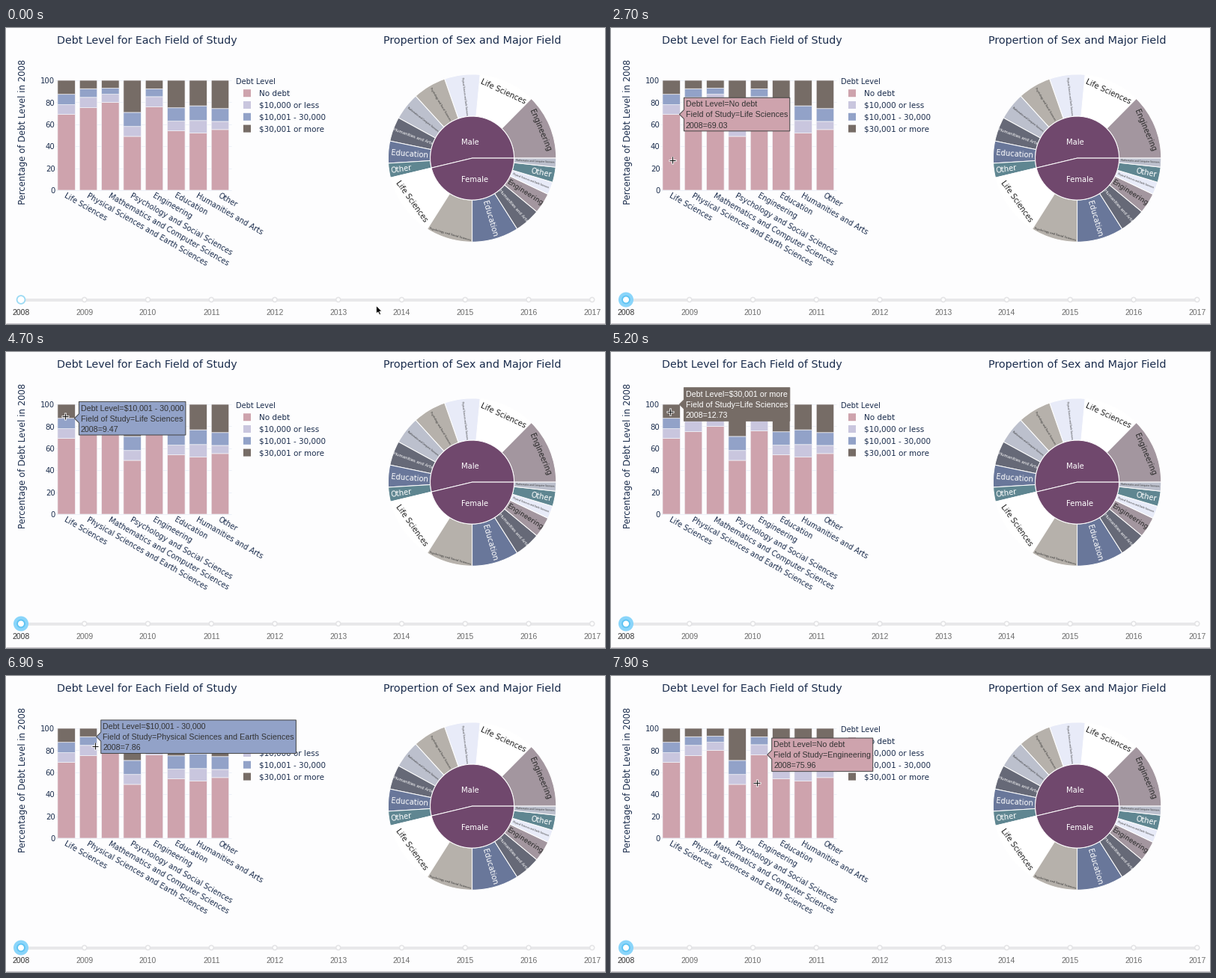
Animation, 800 px wide and 396 px high, one loop 8 s. Source, as a matplotlib script:

```python
import math

import numpy as np
import matplotlib.pyplot as plt
from matplotlib.animation import FuncAnimation
from matplotlib.patches import Circle, Polygon, Rectangle, Wedge

W, H, DPI = 800, 396, 100
PX = 72 / DPI
STEP, FRAMES = 100, 80
NAVY, DARK = "#1b2d4d", "#333333"
SANS, ARIAL = "DejaVu Sans", "Liberation Sans"

FIELDS = ["Life Sciences", "Physical Sciences and Earth Sciences",
          "Mathematics and Computer Sciences", "Psychology and Social Sciences",
          "Engineering", "Education", "Humanities and Arts", "Other"]
LEVELS = ["No debt", "$10,000 or less", "$10,001 - 30,000", "$30,001 or more"]
LEVEL_COLORS = ["#cea3ad", "#c9c6de", "#92a2c8", "#766c66"]
# Cumulative height of each stacked segment
TOPS = [(69.03, 77.80, 87.27, 100), (75.1, 84.5, 92.36, 100),
        (80, 87.3, 92.8, 100), (49, 58, 70.8, 100),
        (75.96, 85.1, 92.3, 100), (54, 62.8, 75, 100),
        (52, 63.4, 76.8, 100), (55.2, 62.6, 74.3, 100)]
PLOT_LEFT, SLOT, BAR_W, BASE, UNIT = 66, 29.33, 23.5, 217, 1.47

fig = plt.figure(figsize=(W / DPI, H / DPI), dpi=DPI, facecolor="#fdfdfe")
ax = fig.add_axes([0, 0, 1, 1])
ax.set_xlim(0, W)
ax.set_ylim(H, 0)
ax.axis("off")


def label(x, y, s, size, color=NAVY, ha="center", angle=0, font=SANS, z=3):
    """Text whose capitals are centred on (x, y), size in pixels."""
    a, drop = math.radians(angle), 0.36 * size
    return ax.text(x + drop * math.sin(a), y + drop * math.cos(a),
                   s.replace("$", r"\$"), fontsize=size * PX, color=color,
                   ha=ha, va="baseline", rotation=angle,
                   rotation_mode="anchor", family=font, zorder=z)


def line(xs, ys, color, width, z=1, cap="butt"):
    return ax.plot(xs, ys, color=color, lw=width * PX, zorder=z,
                   solid_capstyle=cap)[0]


def bar_center(i):
    return PLOT_LEFT + SLOT * (i + 0.5)


def y_at(value):
    return BASE - UNIT * value


def draw_bars():
    label(188.5, 16, "Debt Level for Each Field of Study", 14.25)
    label(22, 139, "Percentage of Debt Level in 2008", 11.65, angle=90)
    for v in range(0, 101, 20):
        line([PLOT_LEFT, PLOT_LEFT + 8 * SLOT], [y_at(v)] * 2, "#edf1f8", 1)
        label(65.5, y_at(v) + 0.5, str(v), 10.1, ha="right")
    for i, (name, tops) in enumerate(zip(FIELDS, TOPS)):
        x, low = bar_center(i), 0
        for top, color in zip(tops, LEVEL_COLORS):
            ax.add_patch(Rectangle((x - BAR_W / 2, y_at(top)), BAR_W,
                                   UNIT * (top - low), fc=color, ec="#f4f4f8",
                                   lw=0.7 * PX, snap=False, zorder=2))
            low = top
        label(x - 1.6, 223.4, name, 9.93, ha="left", angle=-30)
    label(307, 71.5, "Debt Level", 9.9, ha="left")
    for i, (name, color) in enumerate(zip(LEVELS, LEVEL_COLORS)):
        y = 87.2 + 15.8 * i
        ax.add_patch(Rectangle((317, y - 5), 10, 10, fc=color, lw=0,
                               snap=False, zorder=2))
        label(338, y, name, 10.35, ha="left")


# Per field: fill, text colour
LEAF_STYLE = {"Life": ("#ffffff", "#222222"), "Physical": ("#e8ebf8", DARK),
              "Mathematics": ("#bcc0cd", DARK), "Psychology": ("#b6b1ab", DARK),
              "Engineering": ("#a3969f", "#2a2a2a"), "Education": ("#69779a", "white"),
              "Humanities": ("#666977", "white"), "Other": ("#5f8691", "white")}
# Field, end angle, text size, text radius, turn of the text against the radius
MALE = [("Engineering", 45.3, 10, 98.5, -90), ("Life Sciences", 84.6, 10.1, 99, -90),
        (FIELDS[1], 109.2, 2.8, 84, 180), (FIELDS[3], 132.3, 3.3, 84, 180),
        (FIELDS[2], 151.3, 2.8, 84, 180), (FIELDS[6], 168.2, 5.4, 84, 180),
        ("Education", 183.5, 10, 84, 180), ("Other", 193.5, 10, 95.5, 180)]
FEMALE = [("Life Sciences", 237.7, 10.1, 99, 90), (FIELDS[3], 270, 3.6, 106, 90),
          ("Education", 302.4, 10, 84, 0), (FIELDS[6], 320.3, 5.4, 84, 0),
          ("Engineering", 334.5, 9.2, 84, 0), (FIELDS[1], 343.3, 2.8, 84, 0),
          ("Other", 353.8, 10, 94.5, 0), (FIELDS[2], 360, 2.8, 84, 0)]


def draw_sunburst(cx=622.6, cy=174.1, inner=56, outer=112.2):
    def polar(r, deg):
        a = math.radians(deg)
        return cx + r * math.cos(a), cy - r * math.sin(a)

    def sector(r, a, b, color, width=None):
        # The y axis points down, so angles are mirrored
        ax.add_patch(Wedge((cx, cy), r, -b, -a, width=width, fc=color,
                           ec="white", lw=1 * PX, zorder=2))

    label(cx, 16, "Propertion of Sex and Major Field", 14.35)
    start = 0
    for name, end, size, r, turn in MALE + FEMALE:
        fill, ink = LEAF_STYLE[name.split()[0]]
        mid = (start + end) / 2
        sector(outer, start, end, fill, outer - inner)
        label(*polar(r, mid), name, size, ink, angle=mid + turn)
        start = end
    split = MALE[-1][1]
    sector(inner, 0, split, "#70486d")
    sector(inner, split, 360, "#70486d")
    label(620, 152.6, "Male", 10, "white")
    label(626, 202.5, "Female", 10, "white")


def draw_slider(y=363.5):
    line([20, 783], [y, y], "#e8e8ea", 4, cap="round")
    for i in range(10):
        x = 20 + 84.75 * i
        if i:
            ax.add_patch(Circle((x, y), 3, fc="white", ec="#e4e4e6",
                                lw=1.6 * PX, zorder=2))
        label(x, 380.6, str(2008 + i), 10.4, "#6c6c6c" if i else "#333333",
              font=ARIAL)
    line([0, W], [395.2, 395.2], "#c8c4ca", 1)
    glow = Circle((20, y), 10, fc="#8ad5fa", lw=0, zorder=3)
    knob = Circle((20, y), 5.4, fc="white", lw=1.8 * PX, zorder=4)
    ax.add_patch(glow)
    ax.add_patch(knob)
    return glow, knob


draw_bars()
draw_sunburst()
glow, knob = draw_slider()

# Hover box
box = Polygon([(0, 0)] * 3, closed=True, lw=1 * PX, zorder=6)
ax.add_patch(box)
tip_lines = [label(0, 0, "", 10.65, ha="left", font=ARIAL, z=7) for _ in range(3)]

# Pointer shapes
ARROW = np.array([(0, 0), (0, 10.6), (2.4, 8.4), (4.3, 12.2), (6.1, 11.4),
                  (4.3, 7.7), (7.5, 7.5)])
arrow = Polygon(ARROW, closed=True, fc="black", ec="white", lw=0.8 * PX, zorder=9)
ax.add_patch(arrow)
cross = [line([0, 0], [0, 0], color, width, z)
         for color, width, z in [("white", 2.6, 8), ("white", 2.6, 8),
                                 ("#1a1a1a", 1.1, 9), ("#1a1a1a", 1.1, 9)]]

FOCUS = 2000
# Time in ms, x, y of the pointer
PATH = [(0, 494.5, 371.5), (200, 494.5, 371.5), (1200, 84, 192),
        (1400, 82, 188), (1900, 82, 188), (2000, 82, 180), (2300, 82, 176.5),
        (2900, 82, 176.5), (3400, 81, 97), (4100, 80, 96), (4600, 79, 92),
        (4700, 79, 86), (5200, 79, 80), (5800, 91, 83), (6200, 91, 83),
        (6500, 110, 85), (6800, 118, 88), (6900, 119, 93.5), (7100, 121, 96),
        (7600, 194.5, 143), (8000, 194.5, 143)]


def pointer(t):
    for (t0, x0, y0), (t1, x1, y1) in zip(PATH, PATH[1:]):
        if t <= t1:
            u = (t - t0) / (t1 - t0)
            u = u * u * (3 - 2 * u)
            return x0 + (x1 - x0) * u, y0 + (y1 - y0) * u
    return PATH[-1][1:]


def hovered(x, y):
    """Bar and segment under a point, or None."""
    i = int((x - PLOT_LEFT) // SLOT)
    value = (BASE - y) / UNIT
    if not 0 <= i < 8 or abs(x - bar_center(i)) > BAR_W / 2 or not 0 <= value <= 100:
        return None
    return i, next(k for k, top in enumerate(TOPS[i]) if value <= top)


def show_tip(hit):
    for artist in [box] + tip_lines:
        artist.set_visible(hit is not None)
    if hit is None:
        return
    i, k = hit
    tops = TOPS[i]
    share = tops[k] - (tops[k - 1] if k else 0)
    x, y = bar_center(i) + BAR_W / 2 - 1, y_at(tops[k])
    left, half = x + 6, 22.3
    ink = "white" if k == 3 else DARK
    texts = (f"Debt Level={LEVELS[k]}", f"Field of Study={FIELDS[i]}",
             f"2008={share:.2f}")
    for n, (artist, s) in enumerate(zip(tip_lines, texts)):
        artist.set_text(s.replace("$", r"\$"))
        artist.set_position((left + 2.5, y + 14.2 * (n - 1) + 3.9))
        artist.set_color(ink)
    right = left + 5 + max(a.get_window_extent().width for a in tip_lines)
    box.set_xy([(x, y), (left, y - 6), (left, y - half), (right, y - half),
                (right, y + half), (left, y + half), (left, y + 6)])
    box.set_facecolor(LEVEL_COLORS[k])
    box.set_edgecolor(LEVEL_COLORS[k] if k == 3 else "#444444")


def update(frame):
    t = frame * STEP
    x, y = pointer(t)
    focused = t >= FOCUS
    glow.set_visible(focused)
    knob.set_edgecolor("#5cc3f3" if focused else "#9bdaf4")
    knob.set_radius(4.9 if focused else 5.4)
    arrow.set_visible(not focused)
    arrow.set_xy(ARROW + (x, y))
    for n, stroke in enumerate(cross):
        stroke.set_visible(focused)
        arm = 5 if n < 2 else 4.3
        if n % 2:
            stroke.set_data([x, x], [y - arm, y + arm])
        else:
            stroke.set_data([x - arm, x + arm], [y, y])
    # The hover box trails the pointer by one step
    show_tip(hovered(*pointer(t - STEP)) if focused else None)
    return []


anim = FuncAnimation(fig, update, frames=FRAMES, interval=STEP, repeat=True,
                     repeat_delay=0, blit=False)
plt.show()
```
